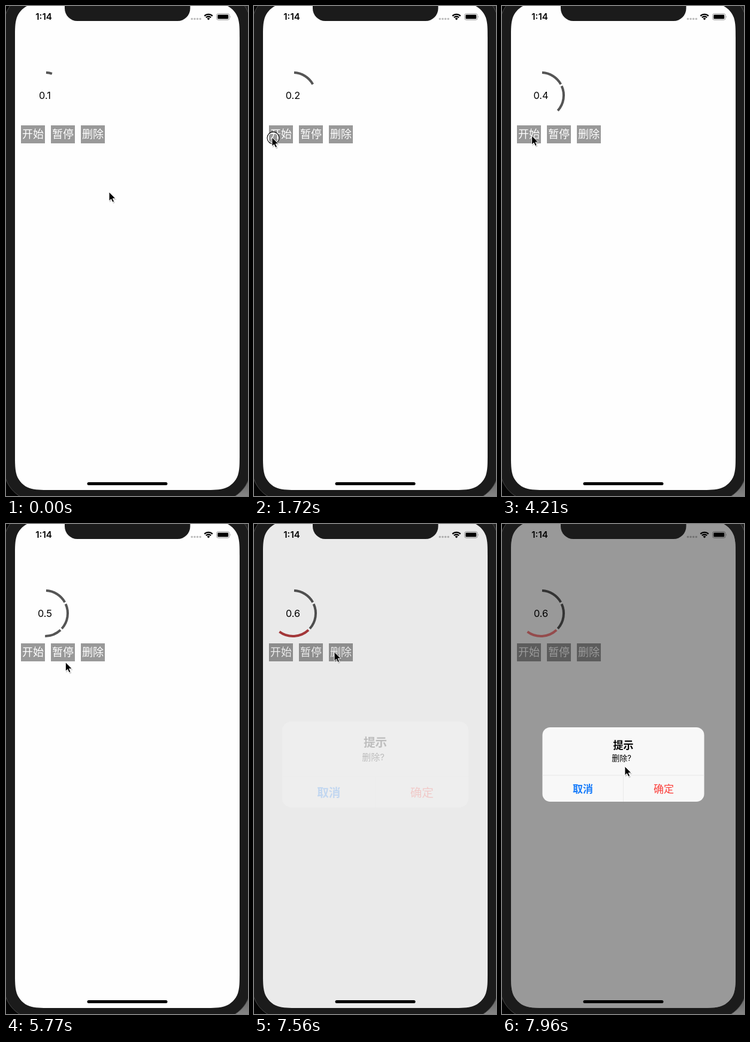
Recreate the animation shown at these times as an HTML page. Size 404 by 817 pixels, loop 8 s.

```html
<!DOCTYPE html>
<html lang="zh">
<head>
<meta charset="utf-8">
<style>
html, body { margin: 0; width: 100%; height: 100%; overflow: hidden; background: #050505; }
svg { display: block; width: 100vw; height: 100vh; }
text { text-anchor: middle; font-family: Inter, "Noto Sans CJK SC", "Noto Sans CJK", sans-serif; }
.button { font-size: 18px; fill: #fff; }
.ring path { fill: none; stroke: #555; stroke-width: 4; }
</style>
</head>
<body>
<svg viewBox="0 0 404 817">
  <defs>
    <linearGradient id="desk" x2="0" y2="1">
      <stop offset=".9" stop-color="#222"/><stop offset="1" stop-color="#858585"/>
    </linearGradient>
    <clipPath id="display"><path id="glass"/></clipPath>
  </defs>

  <rect x="202" width="202" height="817" fill="url(#desk)"/>
  <path id="body" fill="#1b1b1b" stroke="#484848"/>

  <g clip-path="url(#display)">
    <rect x="15" y="-5" width="375" height="812" fill="#fefefe"/>
    <text x="63" y="23.3" font-size="15" font-weight="600">1:14</text>
    <path d="M310.3 21.5h14" stroke="#bdbdbd" stroke-width="3.6" stroke-linecap="round" stroke-dasharray="0 4.65"/>
    <g fill="none" stroke="#000" stroke-width="2.3">
      <path d="M331.3 16.6A9.5 9.5 0 0 1 344.7 16.6M333.9 19.2A5.8 5.8 0 0 1 342.1 19.2"/>
      <path d="M338 23.4L335.6 21A3.4 3.4 0 0 1 340.4 21Z" fill="#000" stroke="none"/>
    </g>
    <rect x="351.5" y="12.8" width="21.5" height="10.4" rx="2.8" fill="none" stroke="#999"/>
    <rect x="353.2" y="14.4" width="18" height="7.2" rx="1.4"/>
    <path d="M374.3 16.3q1.6 1.7 0 3.4z" fill="#999"/>

    <g class="ring"><path/><path/><path/></g>
    <text id="label" x="65" y="155" font-size="16.3"></text>
    <path d="M25 199h40v30h-40zM75 199h40v30h-40zM125 199h40v30h-40z" fill="#999"/>
    <text class="button" x="45" y="220">开始</text>
    <text class="button" x="95" y="220">暂停</text>
    <text class="button" x="145" y="220">删除</text>

    <rect id="dim" x="15" y="-5" width="375" height="812"/>
    <g id="alert">
      <rect id="panel" x="67.5" y="339" width="270" height="124" rx="13" fill="#f8f8f8"/>
      <g id="content">
        <path d="M67.5 419h270M202.5 419v44" stroke="#e3e3e3" stroke-width=".7"/>
        <text x="202.5" y="375" font-size="17" font-weight="600">提示</text>
        <text x="199.5" y="395" font-size="13">删除?</text>
        <text x="135" y="448" font-size="17" font-weight="600" fill="#1a7dfa">取消</text>
        <text x="270" y="448" font-size="17" fill="#fc3d39">确定</text>
      </g>
    </g>
  </g>

  <path d="M98 -1V4A21 21 0 0 0 119 25H286.5A21 21 0 0 0 307.5 4V-1Z" fill="#1b1b1b"/>
  <rect x="135.5" y="794" width="134" height="5" rx="2.5"/>

  <g id="cursor">
    <g id="press" fill="none">
      <circle cx="2" cy="1" r="8.8" stroke="#fff" stroke-width="1.4"/>
      <circle cx="2" cy="1" r="10" stroke="#000" stroke-width="1.1"/>
    </g>
    <path d="M1 2V17.5L4.5 14.3L7 19.5L10 18L7.6 13H12.5Z" opacity=".18"/>
    <path d="M0 0V15.2L3.5 12L5.9 17.3L8.6 16.1L6.2 11H11Z" stroke="#fff"/>
  </g>
</svg>
<script>
const LOOP = 8000, SPEED = 36, GAP = 4.7;   // ring: degrees per second, degrees between arcs
const PRESS_MS = 110, SWING = 38;
const $ = id => document.getElementById(id);
const arcs = document.querySelectorAll('.ring path');
const clamp = v => Math.max(0, Math.min(1, v));
const mix = (a, b, k) => a + (b - a) * k;

// Rectangle with continuous-curvature corners, one quadrant turned four times.
function roundedPath(x, y, w, h, r) {
  const curve = [[.44, 0], [.66, 0], [.897, .075], [.259, .094], [.462, .298], [.556, .556],
    [.075, .237], [.075, .457], [.075, .897]];
  const inset = 1.528 * r;
  let d = `M${x + inset} ${y}`;
  for (let q = 0; q < 4; q++) {
    const cos = [1, 0, -1, 0][q], sin = [0, 1, 0, -1][q];
    const turn = ([u, v]) => `${u * cos - v * sin} ${u * sin + v * cos}`;
    d += `l${turn([(q % 2 ? h : w) - 2 * inset, 0])}c`;
    d += curve.map(([u, v]) => turn([u * r, v * r])).join(' ');
  }
  return d + 'z';
}
$('glass').setAttribute('d', roundedPath(15, -5, 375, 812, 39));
$('body').setAttribute('d', roundedPath(-4.5, -24.5, 414, 851, 59));

// Taps alternate pause and start and end on delete: time pressed, time left, x
const taps = [
  [1080, 1190, 96], [1680, 2150, 30], [3880, 3997, 86],
  [4380, 4580, 49], [6640, 6790, 100], [7390, 7640, 134]
].map(([at, leave, x], i) => ({ at, leave, x, y: 220.3 - 1.4 * i, starts: i % 2 === 1 }));
const stops = [{ at: 0, leave: 60, x: 172, y: 310 }, ...taps, { at: 7940, leave: LOOP + 1, x: 205, y: 404 }];

function pointerAt(t) {
  const i = stops.findIndex(s => t < s.leave);
  const to = stops[i], from = stops[i - 1] || to;
  const k = i ? clamp((t - from.leave) / (to.at - from.leave)) : 1;
  const e = 1 - (1 - k) ** 5;
  const swing = from.starts && to.x < 120 ? SWING * 9.48 * k * (1 - k) ** 3 : 0;
  return [mix(from.x, to.x, e), mix(from.y, to.y, e) + swing];
}

function point(deg) {
  const r = deg * Math.PI / 180;
  return `${65 + 38 * Math.cos(r)} ${149 + 38 * Math.sin(r)}`;
}

function drawRing(t) {
  let angle = -87, start = -420;
  arcs.forEach((arc, i) => {
    const stop = taps[2 * i].leave;
    const running = t > start;
    if (running) {
      const from = angle + (i ? GAP : 0);
      angle = from + (Math.min(t, stop) - start) / 1000 * SPEED;
      arc.setAttribute('d', `M${point(from)}A38 38 0 0 1 ${point(angle)}`);
    } else {
      arc.setAttribute('d', '');
    }
    start = taps[2 * i + 1].leave;
  });
  $('label').textContent = ((angle + 90) / 360 + 1e-3).toFixed(1);

  const red = clamp((t - 7490) / 120);
  arcs[2].style.stroke = `rgb(${mix(85, 242, red)},${mix(85, 42, red)},${mix(85, 45, red)})`;
  arcs[2].style.opacity = mix(1, .6, clamp((t - 7620) / 340));
}

function drawAlert(t) {
  const x = Math.max(0, t - 7520) / 1000 * 20.5;
  const p = 1 - (1 + x) * Math.exp(-x);     // critically damped spring
  $('dim').style.opacity = .4 * p;
  $('panel').style.opacity = clamp(p * 1.4);
  $('content').style.opacity = p;
  $('alert').setAttribute('transform',
    `translate(202.5 401) scale(${mix(1.19, 1, p)}) translate(-202.5 -401)`);
}

function draw(now) {
  const t = now % LOOP;
  drawRing(t);
  drawAlert(t);
  $('cursor').setAttribute('transform', `translate(${pointerAt(t)})`);
  $('press').style.display = taps.some(s => t >= s.at && t < s.at + PRESS_MS) ? '' : 'none';
}

let begin;
function tick(now) {
  begin ??= now;
  draw(now - begin);
  requestAnimationFrame(tick);
}
draw(0);
requestAnimationFrame(tick);
</script>
</body>
</html>
```
